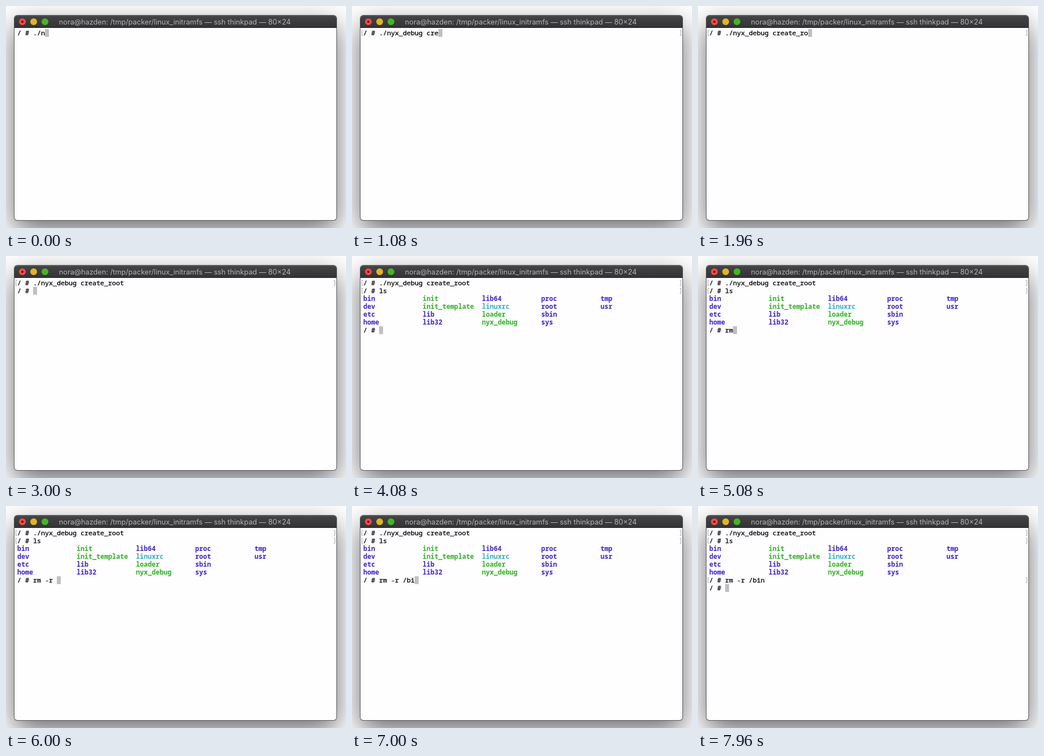
Animation, 602 px wide and 395 px high, one loop 8 s. Source, as an HTML page:

```html
<!DOCTYPE html>
<html lang="en">
<meta charset="utf-8">
<title>Terminal</title>
<style>
html, body { margin: 0; width: 100%; height: 100%; overflow: hidden; background: #fff; }
#window {
  position: absolute; left: 15px; top: 17px; width: 570px; height: 364px;
  border-radius: 5px; background: #fefdff;
  box-shadow: 0 0 0 1px #565658, 0 18px 50px rgba(4, 2, 12, .6);
}
#bar {
  height: 22px; border-radius: 5px 5px 0 0;
  background: linear-gradient(#5a5a5c 1px, #434345 1px, #343436 21px, #222223 21px);
}
svg { position: absolute; left: 0; top: 0; }
text { white-space: pre; }
#title { font: 12.7px Inter, "Open Sans", sans-serif; fill: #b3b3b5; text-anchor: middle; }
#screen { font: 500 11.667px "Noto Sans Mono", "DejaVu Sans Mono", monospace; }
#lines { stroke: #000; stroke-width: .3px; }
#list { font-weight: 700; }
#marks { fill: none; stroke: #a3a2a4; }
</style>
<div id="window"><div id="bar"></div></div>
<svg width="602" height="395">
  <circle cx="29" cy="28" r="6" fill="#fb4a47"/>
  <circle cx="29" cy="28" r="2" fill="#5c0806"/>
  <circle cx="49" cy="28" r="6" fill="#e2b425"/>
  <circle cx="69" cy="28" r="6" fill="#41b822"/>
  <text id="title" x="299" y="33">nora@hazden: /tmp/packer/linux_initramfs — ssh thinkpad — 80×24</text>
  <g id="screen">
    <rect id="cursor" width="7" height="14" fill="#c0bfc1"/>
    <g id="marks"></g>
    <g id="lines"></g>
    <g id="list"></g>
  </g>
</svg>
<script>
const LOOP = 8000, LEFT = 20, TOP = 41, CELL = 7, ROW = 14, LISTED = 4080;

// What the terminal prints, and when
const output = [
  [0, '/ # ./n'], [80, 'yx_debug '],
  [800, 'c'], [920, 'r'], [1080, 'e'], [1160, 'a'], [1240, 't'], [1320, 'e'],
  [1680, '_'], [1800, 'r'], [1960, 'o'], [2120, 'o'], [2240, 't'],
  [2800, '\n'], [3000, '/ # '], [3600, 'l'], [3760, 's'],
  [LISTED, '\n\n\n\n\n/ # '],
  [4840, 'r'], [4960, 'm'], [5320, ' '], [5520, '-'], [5680, 'r'], [5840, ' '],
  [6480, '/'], [6760, 'b'], [6920, 'i'], [7080, 'n'],
  [7680, '\n/ # ']
];
const marks = [[40, 0], [4040, 1], [7640, 6]];
const columns = [
  'bin dev etc home', 'init init_template lib lib32', 'lib64 linuxrc loader nyx_debug',
  'proc root sbin sys', 'tmp usr'
];
const tints = { linuxrc: '#2fafc2' };
for (const name of ['init', 'init_template', 'loader', 'nyx_debug']) tints[name] = '#2eb31f';

const $ = id => document.getElementById(id);
function add(parent, tag, attrs, text = '') {
  const el = document.createElementNS('http://www.w3.org/2000/svg', tag);
  for (const key in attrs) el.setAttribute(key, attrs[key]);
  el.textContent = text;
  return $(parent).appendChild(el);
}
const baseline = row => TOP + 11 + ROW * row;

columns.forEach((names, col) => names.split(' ').forEach((name, i) =>
  add('list', 'text', {
    x: LEFT + col * 15 * CELL, y: baseline(2 + i), fill: tints[name] || '#3b22c8'
  }, name)));

const lines = Array.from({ length: 8 }, (_, row) =>
  add('lines', 'text', { x: LEFT, y: baseline(row) }));

const brackets = marks.map(([time, row]) => {
  const y = TOP + 2.5 + ROW * row;
  return [time, add('marks', 'path', { d: `M19.5 ${y}h-2v9h2M580.5 ${y}h2v9h-2` })];
});

const show = (el, on) => el.setAttribute('visibility', on ? 'visible' : 'hidden');

function draw(now) {
  const t = now % LOOP;
  const rows = output.filter(([time]) => time <= t).map(([, s]) => s).join('').split('\n');
  const last = rows.length - 1;
  lines.forEach((el, i) => {
    const s = rows[i] || '';
    if (el.textContent !== s) el.textContent = s;
  });
  $('cursor').setAttribute('x', LEFT + CELL * rows[last].length);
  $('cursor').setAttribute('y', TOP + ROW * last);
  show($('list'), t >= LISTED);
  for (const [time, el] of brackets) show(el, t >= time);
  requestAnimationFrame(draw);
}
draw(0);
</script>
</html>
```
